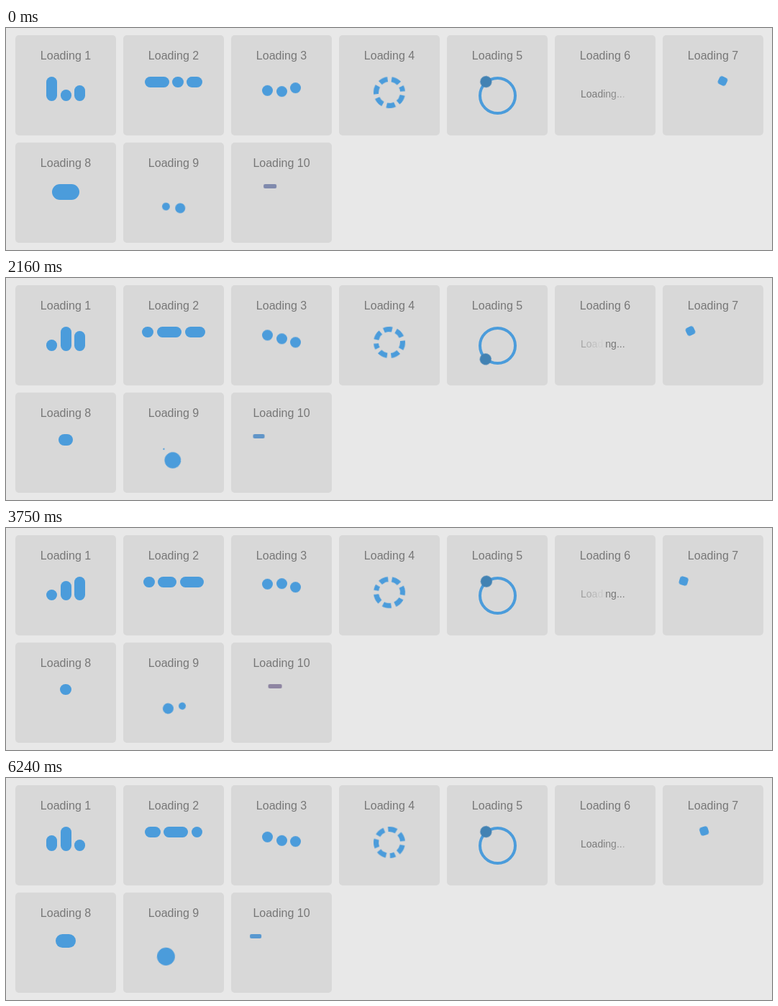
These frames come from a looping animation (1065 by 310 pixels, 6.27 s). An HTML page:

```html
<!DOCTYPE html>
<html lang="en">
<head>
<meta charset="utf-8">
<title>Loading animations</title>
<style>
  html, body { margin: 0; width: 100%; height: 100%; overflow: hidden; background: #e8e8e8; }
  body { font: 16px "Liberation Sans", Arial, sans-serif; color: #777; }
  #cards { position: absolute; left: 13px; top: 10px; width: 1052px; }
  .card {
    float: left; width: 100px; height: 100px; padding: 20px; margin: 0 10px 10px 0;
    border-radius: 5px; background: #d8d8d8; text-align: center;
  }
  .card p { margin: 0; height: 18px; padding-bottom: 20px; }
  .line {
    display: inline-block; width: 15px; height: 15px;
    border-radius: 15px; background: #4b9cdb;
  }
  .dashes { display: block; width: 44px; height: 44px; margin: 0 auto; overflow: visible; }
  .ring {
    position: relative; width: 45px; height: 45px; margin: 0 auto;
    border: 4px solid #4b9cdb; border-radius: 100%;
  }
  .holder { position: absolute; left: 17px; top: 0; width: 12px; height: 45px; }
  .ball {
    position: absolute; left: 0; top: -11px; width: 16px; height: 16px;
    border-radius: 100%; background: #4282b3;
  }
  .word { padding: 16px; }
  .letter { float: left; font-size: 14px; }
  .square { width: 12px; height: 12px; border-radius: 4px; background: #4b9cdb; }
  .spinner { position: relative; width: 45px; height: 45px; margin: 0 auto; }
  .bubble {
    position: absolute; left: 0; top: 0; width: 25px; height: 25px;
    border-radius: 100%; background: #4b9cdb;
  }
  .bubble + .bubble { top: 20px; }
  .bar { float: left; width: 15px; height: 6px; border-radius: 2px; background: #4b9cdb; }
</style>
</head>
<body>
<div id="cards"></div>
<script>
const LOOP = 6270, STEP = 30;
const START = 219537, STEP_TIME = 31.25; // loader clock: offset and advance per step
const SOFT = 'cubic-bezier(0.17, 0.37, 0.43, 0.67)';

const line = '<div class="line"></div>';
const threeLines = [line, line, line].join(' ');
const letters = [...'Loading...'].map(c => `<div class="letter">${c}</div>`).join('');
const dashPattern = '22 17' + ' 36.5 17'.repeat(6);

const loaders = [
  threeLines,
  threeLines,
  threeLines,
  `<svg class="dashes" viewBox="0 0 44 44"><circle cx="22" cy="22" r="18.5" fill="none"
    stroke="#4b9cdb" stroke-width="7" pathLength="360" stroke-dasharray="${dashPattern}"
    transform="rotate(-113 22 22)"/></svg>`,
  '<div class="ring"><div class="holder"><div class="ball"></div></div></div>',
  `<div class="word">${letters}</div>`,
  '<div class="square"></div>',
  line,
  '<div class="spinner"><div class="bubble"></div><div class="bubble"></div></div>',
  '<div class="bar"></div>'
];

const cards = document.getElementById('cards');
cards.innerHTML = loaders.map((html, i) =>
  `<div class="card"><p>Loading ${i + 1}</p>${html}</div>`).join('');

const animations = [];

// Animates every match in a card; delayOf maps its index to a delay in ms.
function run(card, selector, frames, duration, easing, delayOf = () => 0) {
  cards.children[card - 1].querySelectorAll(selector).forEach((el, i) => {
    const animation = el.animate({ ...frames, easing },
      { duration, delay: delayOf(i), iterations: Infinity });
    animation.pause();
    animations.push(animation);
  });
}

const there = (a, b) => [a, b, a];
const sizes = there('15px', '35px');

run(1, '.line', { height: sizes }, 1500, 'ease', i => i * 500);
run(2, '.line', { width: sizes }, 1500, 'ease', i => i * 500);
run(3, '.line', { transform: there('translateY(0)', 'translateY(15px)') },
  600, 'linear', i => 300 - i * 100);
run(4, '.dashes', { transform: ['rotate(0deg)', 'rotate(180deg)', 'rotate(360deg)'] },
  1500, SOFT, () => 300);
run(5, '.holder', { transform: ['rotate(0deg)', 'rotate(360deg)'] }, 1300, 'linear');
run(6, '.letter', { opacity: [0, 1] }, 1600, 'ease', i => 480 + i * 120);
run(7, '.square', {
  transform: there('translate(0, 0) rotate(0deg)', 'translate(70px, 0) rotate(360deg)')
}, 1500, SOFT);
run(8, '.line', { width: sizes, padding: there('0px', '4px') }, 1500, SOFT);
run(9, '.spinner', { transform: ['rotate(0deg)', 'rotate(360deg)'] }, 2000, 'linear');
run(9, '.bubble', { transform: there('scale(0)', 'scale(1)') },
  2000, 'ease-in-out', i => -1000 * i);
run(10, '.bar', {
  transform: there('translateX(0)', 'translateX(80px)'),
  backgroundColor: there('#4b9cdb', '#f5634a'),
  width: there('15px', '25px')
}, 2000, SOFT);

const origin = performance.now();

function draw() {
  const step = Math.floor((performance.now() - origin) % LOOP / STEP);
  const time = START + step * STEP_TIME;
  for (const animation of animations) animation.currentTime = time;
  requestAnimationFrame(draw);
}
draw();
</script>
</body>
</html>
```
